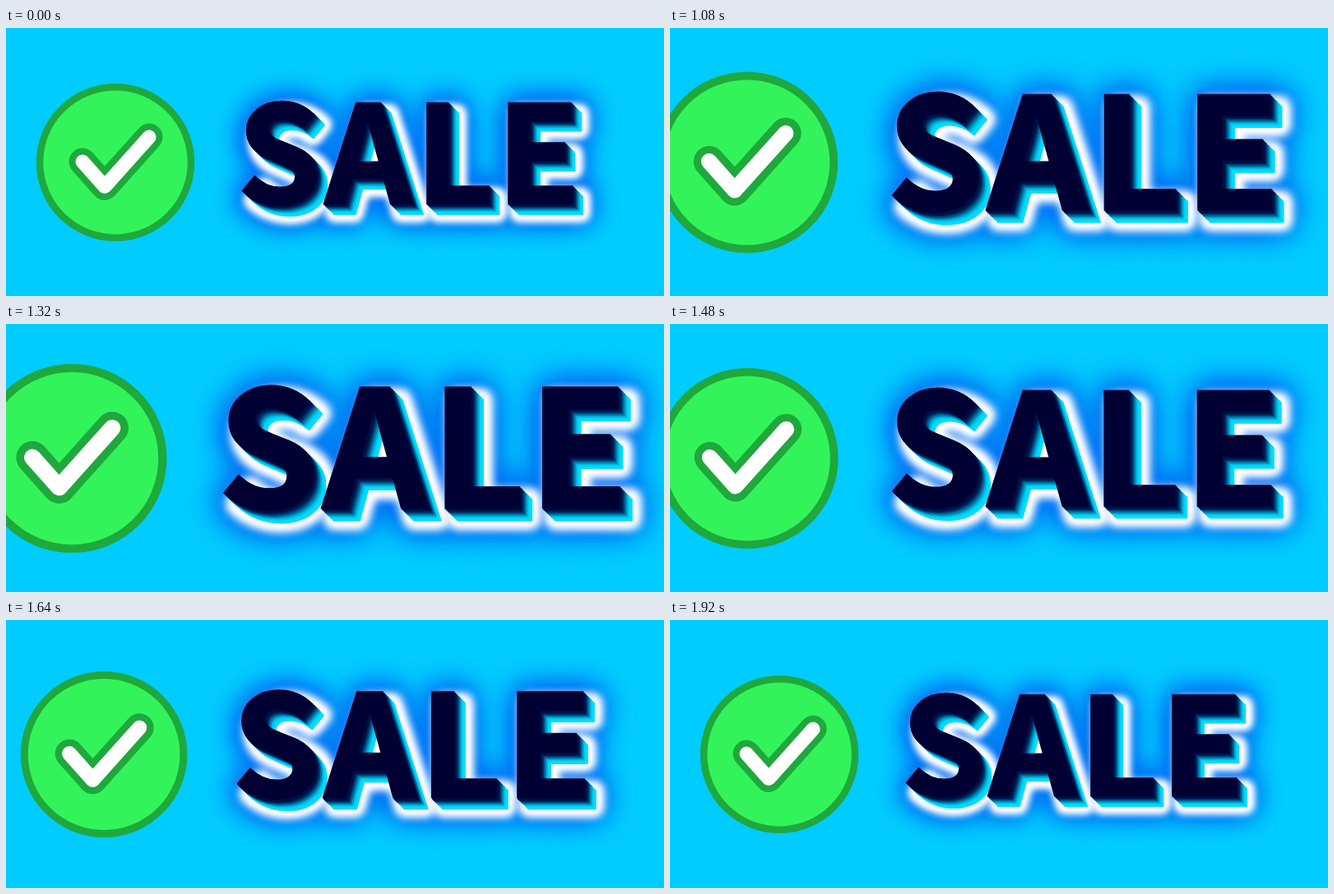
Recreate the animation shown at these times as an HTML page with a canvas. Size 800 by 327 pixels, loop 1.96 s.

```html
<!DOCTYPE html>
<html lang="en">
<head>
<meta charset="utf-8">
<title>Sale</title>
<style>
  html, body { margin: 0; height: 100%; overflow: hidden; background: #00ccff; }
  canvas { display: block; }
</style>
</head>
<body>
<canvas id="stage" width="800" height="327"></canvas>
<script>
const ctx = document.getElementById('stage').getContext('2d');
const HOLD = 1000, STEP = 40, STEPS = 24, PEAK = 8, LOOP = HOLD + STEP * STEPS;
const CENTER = { x: 400, y: 164 };
const BASELINE = 213.9, DEPTH = 13, WEIGHT = 2.5;
const FONT = '700 164px "Noto Sans CJK JP", "Noto Sans CJK SC", "Noto Sans CJK", "Noto Sans", sans-serif';
// Left edge of each letter
const LETTERS = [['S', 286], ['A', 385.5], ['L', 510.3], ['E', 609.3]];

// Cubic Bezier ease (0.4, 0, 0.4, 1), solved by bisection
function easeInOut(t) {
  let lo = 0, hi = 1;
  for (let i = 0; i < 25; i++) {
    const u = (lo + hi) / 2;
    const x = 1.2 * u * (1 - u) + u ** 3;
    if (x < t) lo = u; else hi = u;
  }
  return lo * lo * (3 - 2 * lo);
}

// Fast decaying rise, then a slow smooth fall
function scaleAt(step) {
  const amount = step < PEAK
    ? (1 - 0.66 ** step) / (1 - 0.66 ** PEAK)
    : 1 - easeInOut((step - PEAK) / (STEPS - PEAK));
  return 1 + 0.2 * amount;
}

function word(offset, color, spread = 0) {
  ctx.fillStyle = ctx.strokeStyle = color;
  ctx.lineWidth = WEIGHT + spread;
  ctx.lineJoin = spread ? 'round' : 'miter';
  for (const [letter, left] of LETTERS) {
    const x = left + WEIGHT / 2 + ctx.measureText(letter).actualBoundingBoxLeft + offset;
    ctx.strokeText(letter, x, BASELINE + offset);
    ctx.fillText(letter, x, BASELINE + offset);
  }
}

// Two passes make the halo denser near the letters
function glow(offset, color, spread, blur) {
  ctx.filter = `blur(${blur}px)`;
  word(offset, color, spread);
  word(offset, color, spread);
  ctx.filter = 'none';
}

function sideColor(t) {
  const u = Math.min(1, Math.max(0, (t - 0.1) / 0.75));
  const k = u * u * (3 - 2 * u);
  return `rgb(0, ${15 + 205 * k}, ${70 + 185 * k})`;
}

function drawSale(scale) {
  ctx.font = FONT;
  glow(9, '#0070f5', 26, 16 * scale);
  glow(12, '#fff', 16, 5 * scale);
  for (let d = DEPTH; d > 0; d -= 0.5) word(d, sideColor(d / DEPTH));
  word(0, '#000033');
}

function drawBadge() {
  ctx.lineCap = ctx.lineJoin = 'round';
  ctx.beginPath();
  ctx.arc(133, 164, 92, 0, 2 * Math.PI);
  ctx.fillStyle = '#32f45a';
  ctx.fill();
  ctx.strokeStyle = '#1fa83c';
  ctx.lineWidth = 8.5;
  ctx.stroke();

  ctx.beginPath();
  ctx.moveTo(93, 163);
  ctx.lineTo(120, 193.5);
  ctx.lineTo(174, 133);
  ctx.lineWidth = 33;
  ctx.stroke();
  ctx.strokeStyle = '#fff';
  ctx.lineWidth = 17;
  ctx.stroke();
}

function draw(step) {
  const scale = scaleAt(step);
  ctx.setTransform(1, 0, 0, 1, 0, 0);
  ctx.fillStyle = '#00ccff';
  ctx.fillRect(0, 0, 800, 327);
  ctx.translate(CENTER.x, CENTER.y);
  ctx.scale(scale, scale);
  ctx.translate(-CENTER.x, -CENTER.y);
  drawSale(scale);
  drawBadge();
}

let shown = -1;
function tick() {
  const t = performance.now() % LOOP;
  const step = t < HOLD ? 0 : Math.floor((t - HOLD) / STEP) + 1;
  if (step !== shown) draw(shown = step);
  requestAnimationFrame(tick);
}
tick();
</script>
</body>
</html>
```
